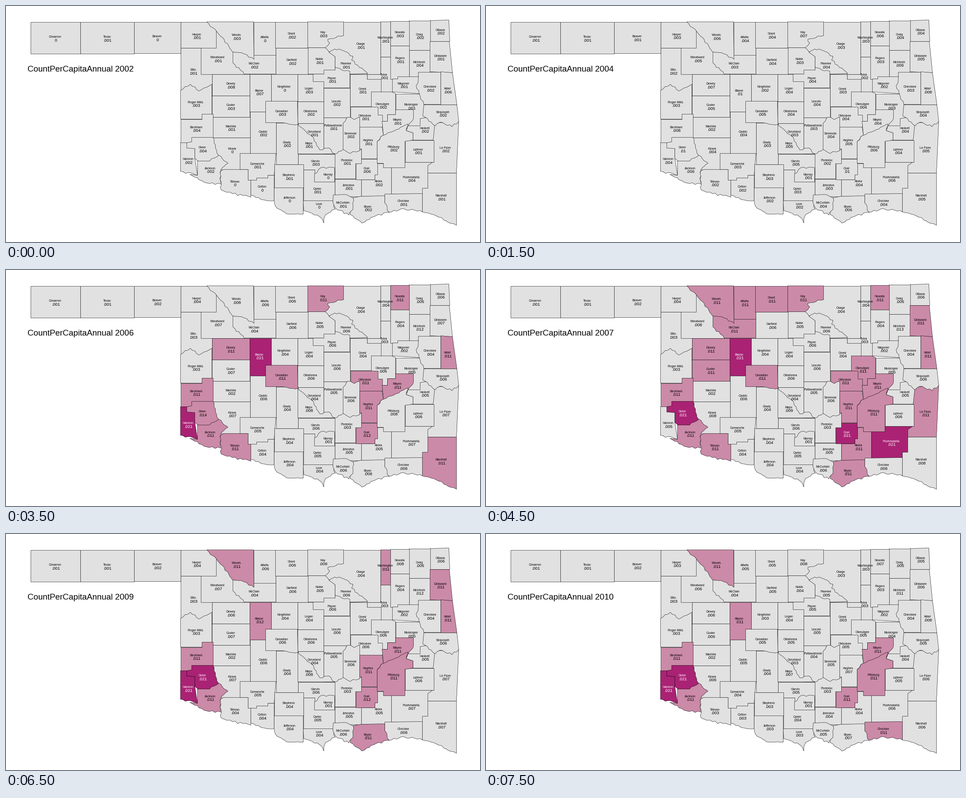
Recreate the animation shown at these times as a matplotlib script. Size 1058x529 px, loop 8 s.

```python
import math
import numpy as np
import matplotlib.pyplot as plt
from matplotlib.animation import FuncAnimation
from matplotlib.patches import Polygon

WIDTH, HEIGHT = 1058, 529
GRAY, PINK, PLUM = "#e1e1e1", "#cb8aa8", "#aa2274"

# Highlighted outlines by year.
HIGH = {
    2005: "Woods, Blaine, Beckham, Coal",
    2006: "Kay, Nowata, Adair, Dewey, Canadian, Beckham, Greer, Jackson, Tillman, "
          "Okfuskee, Mayes, Hughes, Coal, Marshall",
    2007: "Woods, Alfalfa, Grant, Kay, Nowata, Delaware, Adair, McClain, Dewey, Custer, "
          "Canadian, Beckham, Jackson, Tillman, Okmulgee, Okfuskee, Mayes, Hughes, "
          "Pittsburg, Atoka, Bryan, Le Flore",
    2008: "Alfalfa, Kay, Nowata, Delaware, Adair, Woodward, McClain, Dewey, Canadian, "
          "Beckham, Mayes, Pittsburg, Coal, Atoka, Pushmataha, McCurtain",
    2009: "Woods, Washington, Delaware, Adair, Blaine, Beckham, Jackson, Mayes, Hughes, "
          "Pittsburg, Coal, Bryan",
    2010: "Woods, Blaine, Beckham, Jackson, Mayes, Pittsburg, Coal, Choctaw",
}
HIGHEST = {
    2005: "Greer",
    2006: "Blaine, Harmon",
    2007: "Blaine, Greer, Coal, Pushmataha",
    2008: "Woods, Blaine, Greer, Harmon, Hughes",
    2009: "Greer, Harmon",
    2010: "Greer, Harmon",
}

plt.rcParams["font.family"] = "Liberation Sans"
fig = plt.figure(figsize=(WIDTH / 72, HEIGHT / 72), dpi=72, facecolor="white")
ax = fig.add_axes([0, 0, 1, 1])
ax.set_xlim(-0.5, WIDTH - 0.5)
ax.set_ylim(HEIGHT - 0.5, -0.5)
ax.axis("off")

rng = np.random.default_rng(4)
counties = {}


def river(start, end, sway=2.2):
    """Points of a meandering line after start, up to and including end."""
    start, end = np.array(start), np.array(end)
    length = math.dist(start, end)
    steps = max(2, round(length / 6))
    normal = np.array([start[1] - end[1], end[0] - start[0]]) / length
    offsets = rng.uniform(-sway, sway, steps)
    offsets[-1] = 0
    return [start + (end - start) * (i + 1) / steps + normal * offsets[i]
            for i in range(steps)]


def trace(outline):
    """Two corners make a box; a tilde marks a river leading to that point."""
    marks = outline.split()
    points = [tuple(map(float, m.lstrip("~").split(","))) for m in marks]
    if len(points) == 2:
        (left, top), (right, bottom) = points
        return [(left, top), (right, top), (right, bottom), (left, bottom)]
    path = [points[0]]
    for mark, start, end in zip(marks[1:], points, points[1:]):
        path += river(start, end) if mark.startswith("~") else [end]
    return path


def county(name, first, level, outline, at=None):
    """Add a county with its first rate and usual later rate, per thousand."""
    path = np.array(trace(outline))
    x, y = at or (path.min(axis=0) + path.max(axis=0)) / 2 - (0, 2.5)
    shape = Polygon(path, closed=True, fc=GRAY, ec="black", lw=0.6,
                    zorder=1 + len(counties) / 100)
    ax.add_patch(shape)
    style = dict(ha="center", va="baseline", zorder=5)
    label = ax.text(x, y + 2.5, name, fontsize=6.8, **style)
    value = ax.text(x + 1, y + 11, "", fontsize=9.3, **style)
    counties[name] = shape, label, value, first, level


# Later counties cover the spare area of earlier ones.
county("Cimarron", 0, 1, "54,35 165,106")
county("Texas", 1, 1, "165,35 285,106")
county("Beaver", 0, 2, "285,35 389,105")
county("Ellis", 1, 3, "389,93 459,200", (417, 142))
county("Woodward", 1, 7, "434,50 531,152", (472, 114))
county("Harper", 1, 4, "389,35 468,93", (425, 63))
county("McClain", 2, 4, "506,103 602,103 602,152 531,152 ~506,127", (553, 128))
county("Alfalfa", 0, 6, "552,35 601,109")
county("Woods", 3, 8, "448,35 552,35 553,119 ~525,104 506,103 ~478,67 ~448,35", (514, 64))
county("Grant", 2, 6, "600,35 673,93")
county("Garfield", 2, 6, "601,93 674,152")

county("Osage", 1, 4, "700,35 835,152", (791, 84))
county("Kay", 3, 9, "673,35 753,35 753,66 ~718,74 ~722,82 ~712,93 673,93", (707, 58))
county("Noble", 1, 5, "674,93 712,93 ~734,113 734,152 674,152", (699, 118))
county("Pawnee", 1, 6, "720,103 733,96 ~748,98 ~774,112 ~771,121 ~807,151 767,152 "
       "734,137 734,113", (758, 128))
county("Payne", 1, 6, "684,152 709,152 709,143 734,143 734,137 ~767,146 767,183 684,183",
       (727, 161))
county("Logan", 3, 4, "650,152 684,152 684,168 708,168 708,213 650,213", (675, 184))

county("Washington", 1, 4, "835,34 857,113", (846, 70))
county("Craig", 2, 6, "898,32 947,98")
county("Nowata", 3, 8, "857,33 899,88")
county("Ottawa", 2, 6, "947,32 988,31 990,79 947,79")
county("McIntosh", 4, 12, "899,98 946,159", (922, 125))
county("Delaware", 1, 7, "946,79 989,79 996,149 946,147", (969, 111))
county("Tulsa", 1, 3, "835,113 862,113 862,192 805,192 805,152 835,152", (843, 153))
county("Rogers", 1, 4, "857,88 899,163", (879, 116))
county("Creek", 1, 4, "767,152 805,152 805,163 836,163 836,224 767,224", (795, 185))
county("Wagoner", 1, 2, "862,163 874,163 874,158 925,158 925,196 862,192", (887, 173))
county("Muskogee", 1, 5, "869,196 935,268", (904, 220))
county("Cherokee", 2, 4, "920,148 970,148 970,220 932,220 ~922,196 ~916,184 ~920,159",
       (946, 180))
county("Adair", 6, 9, "970,147 996,149 1006,221 970,221", (985, 184))

county("Dewey", 8, 6, "459,152 543,200")
county("Blaine", 7, 12, "543,152 591,236", (565, 189))
county("Kingfisher", 0, 4, "591,152 650,213")
county("Custer", 3, 7, "459,200 543,248")
county("Roger Mills", 3, 3, "389,189 ~411,175 ~430,190 ~459,175 459,253 389,253",
       (423, 215))
county("Washita", 1, 2, "460,248 544,294")
county("Beckham", 4, 10, "389,253 436,253 436,241 461,241 461,306 389,306", (424, 271))
county("Caddo", 2, 6, "544,236 602,330")
county("Grady", 2, 4, "602,261 651,354", (626, 305))
county("Canadian", 3, 6, "579,213 650,213 651,265 ~615,261 579,261", (615, 235))
county("Oklahoma", 2, 6, "650,213 708,262")
county("Lincoln", 2, 6, "708,183 767,249", (737, 213))
county("Cleveland", 1, 4, "651,262 708,322", (687, 281))
county("Pottawatomie", 1, 5, "708,249 761,330", (730, 267))
county("Major", 1, 8, "651,265 ~682,291 ~700,322 ~721,318 ~733,331 651,331", (675, 307))

county("Okmulgee", 2, 6, "815,192 861,192 869,196 869,243 851,243 851,258 829,258 815,224",
       (840, 219))
county("Okfuskee", 1, 6, "768,225 829,225 829,243 839,243 839,271 768,271", (801, 245))
county("Seminole", 2, 6, "752,262 ~761,249 768,249 777,254 ~789,249 789,335 752,335",
       (768, 285))
county("Johnston", 1, 5, "733,387 792,426", (764, 401))
county("Atoka", 2, 5, "792,388 822,388 822,352 859,352 859,425 792,425", (831, 392))
county("Coal", 6, 12, "780,342 828,342 828,377 822,377 822,388 780,388", (804, 363))
county("Hughes", 1, 8, "789,271 839,271 842,289 ~828,303 828,342 793,342 793,320 789,320",
       (808, 300))
county("Pontotoc", 1, 3, "733,331 ~752,321 ~768,330 ~793,320 793,353 780,353 780,387 "
       "733,387", (760, 345))
county("Mayes", 1, 6, "869,232 909,232 909,252 ~893,275 842,290 839,258 851,258 851,243 "
       "869,243", (873, 254))
county("Haskell", 2, 5, "924,252 957,246 957,300 908,300 908,284 893,279 897,268 924,268",
       (934, 273))
county("Pushmataha", 4, 7, "859,349 953,420", (904, 383))
county("Le Flore", 2, 7, "957,262 1010,258 1005,374 941,374 941,357 953,349 953,300",
       (980, 317))
county("Sequoyah", 2, 6, "932,221 1006,221 1010,258 ~995,270 ~968,260 ~957,268 ~930,246",
       (974, 237))
county("Latimer", 1, 6, "890,300 954,349", (919, 321))
county("Pittsburg", 2, 8, "828,352 828,303 ~842,289 ~886,269 ~897,264 ~893,279 908,284 "
       "908,300 890,303 890,362 842,362 842,352", (864, 315))

county("Kiowa", 0, 7, "455,294 544,366", (504, 319))
county("Harmon", 2, 5, "389,306 421,306 421,341 427,379 ~389,370", (406, 342))
county("Tillman", 0, 4, "484,366 540,366 540,389 546,390 546,428 ~505,420 ~480,412 "
       "~478,371", (510, 393))
county("Jackson", 2, 8, "427,347 474,334 ~495,352 ~479,367 ~479,399 ~447,396 ~410,377 "
       "427,379", (455, 363))
county("Greer", 4, 14, "414,294 462,294 ~474,334 ~454,347 428,347 421,341 421,319 403,318 "
       "403,306 414,304", (438, 316))
county("Cotton", 0, 4, "546,380 598,379 598,436 ~575,434 ~546,424", (571, 404))
county("Comanche", 1, 5, "522,330 602,330 598,379 584,379 584,385 559,385 559,390 540,390 "
       "540,366 522,366", (560, 353))
county("Carter", 1, 5, "663,366 733,436", (694, 409))
county("Garvin", 3, 6, "651,331 733,331 733,376 688,376 688,366 651,366", (690, 347))
county("Stephens", 1, 4, "598,354 663,407")
county("Murray", 0, 1, "688,376 ~702,362 ~733,362 733,394 688,394", (718, 377))
county("Jefferson", 0, 4, "598,407 663,407 663,466 ~632,466 ~606,454 ~598,436", (632, 429))
county("Love", 0, 4, "663,436 729,436 ~734,455 ~713,467 ~709,486 ~700,472 ~664,458",
       (698, 443))
county("Marshall", 1, 7, "941,374 1005,374 1005,491 ~966,473 ~929,461 929,408 941,408",
       (971, 424))
county("Choctaw", 1, 6, "845,421 929,420 929,461 ~888,454 ~855,462 845,455", (886, 436))
county("Bryan", 2, 8, "770,430 792,426 845,425 845,441 ~855,462 ~826,469 ~794,486 "
       "~768,467", (807, 449))
county("McCurtain", 1, 6, "730,423 758,422 775,430 ~774,455 ~765,468 ~735,453 ~729,440",
       (751, 440))

title = ax.text(48, 146.5, "", fontsize=18.6, va="baseline")


def as_text(per_thousand):
    whole = round(per_thousand)
    return f".{whole:03d}".rstrip("0") if whole else "0"


def draw(frame):
    year = 2002 + (frame + 1) // 2
    title.set_text(f"CountPerCapitaAnnual {year}")
    high = HIGH.get(year, "").split(", ")
    highest = HIGHEST.get(year, "").split(", ")
    growth = 1.1 * math.sin(math.pi * (year - 2002) / 11)
    for name, (shape, label, value, first, level) in counties.items():
        rate = first + (level - first) * growth
        fill, ink = GRAY, "black"
        if name in highest:
            fill, ink, rate = PLUM, "white", max(rate, 21)
        elif name in high:
            fill, rate = PINK, max(rate, 11)
        shape.set_facecolor(fill)
        value.set_text(as_text(rate))
        label.set_color(ink)
        value.set_color(ink)
    return []


animation = FuncAnimation(fig, draw, frames=16, interval=500, repeat=True,
                          repeat_delay=0, blit=False)
plt.show()
```
